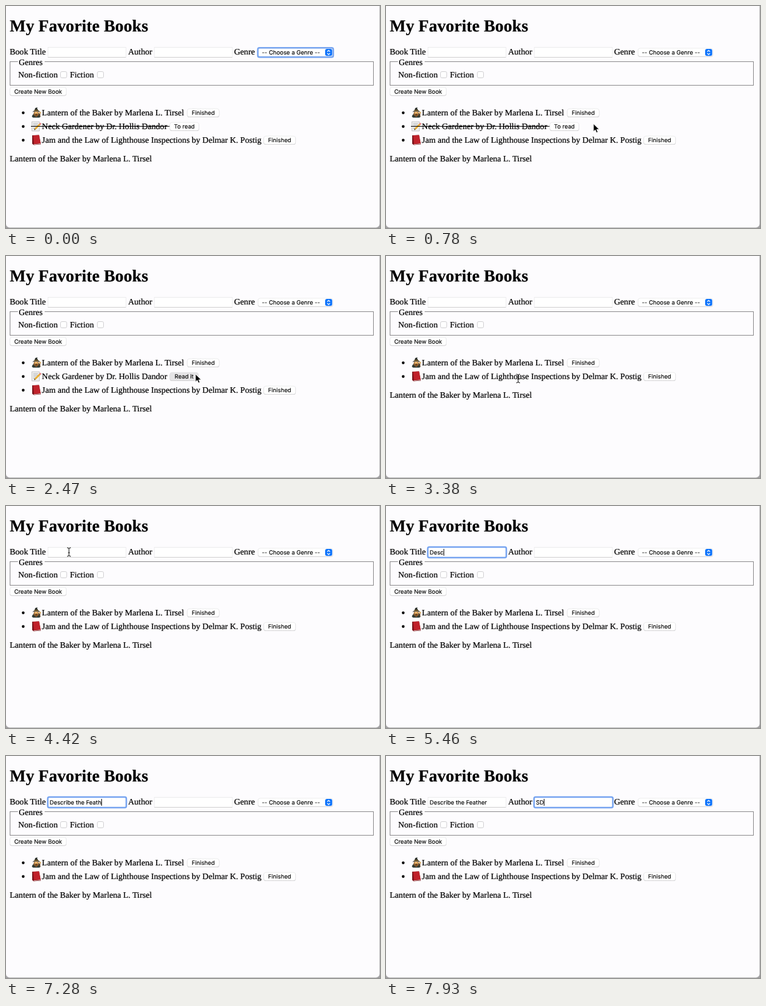
Animation, 600 px wide and 357 px high, one loop 8 s. Source, as an HTML page:

```html
<!DOCTYPE html>
<html lang="en">
<head>
<meta charset="utf-8">
<title>My Favorite Books</title>
<style>
  html, body { margin: 0; width: 100%; height: 100%; overflow: hidden; background: #a3a2a4; }
  svg { display: block; width: 100vw; height: 100vh; }
  text {
    font: 13.6px "Liberation Serif", Times, serif; white-space: pre;
    stroke: #000; stroke-width: .22; text-rendering: geometricPrecision;
  }
  .heading { font-size: 27.2px; font-weight: bold; }
  .ui { font: 9.3px Inter, sans-serif; stroke-width: .12; }
  .mid { text-anchor: middle; }
  .ring { fill: none; stroke: #78a5f0; stroke-width: 2.5; }
</style>
</head>
<body>
<svg id="stage" viewBox="0 0 600 357">
  <defs>
    <g id="mage">
      <path d="M1 15Q2 10 8 9T15 15L13 16.5H3Z" fill="#2f3b35"/>
      <path d="M4.5 7H11.5L12.5 12 8 15.5 3.5 12Z" fill="#8a5a2c"/>
      <circle cx="8" cy="9" r="2.8" fill="#e9b36a"/>
      <path d="M6 10.5Q8 9.8 10 10.5L8 13.5Z" fill="#5d3a1c"/>
      <path d="M1.5 7.5L5 5 6.5 1 10 0 9.5 2 11.5 5 15 7.5Q8 5.5 1.5 7.5Z" fill="#2b2f2a"/>
      <path d="M4.8 5.2Q8 4.2 11.5 5.2" fill="none" stroke="#a9802c"/>
      <path d="M14 9V15" stroke="#7c5128" stroke-width="1.1"/>
      <circle cx="14" cy="8.5" r="1.3" fill="#d99a31"/>
    </g>
    <g id="memo">
      <path d="M1 1H13V16H1Z" fill="#f0f0ee" stroke="#b9b9bb" stroke-width=".8"/>
      <path d="M3 4H11M3 6.5H11M3 9H9M3 11.5H8" stroke="#a0a4ac" stroke-width=".8"/>
      <path d="M6 13L14.5 4.5" stroke="#eaae30" stroke-width="2.6"/>
      <path d="M13.5 5.5L15.5 3.5" stroke="#e58387" stroke-width="2.6"/>
      <path d="M4.5 14.5L5 12 7 14Z" fill="#4c4136"/>
    </g>
    <g id="book">
      <path d="M1.5 1L12.5 .5 15.5 15.5 4 16.5 1.5 14.5Z" fill="#7d141c"/>
      <path d="M4 15.2L15 14V15L4.5 16Z" fill="#e4dad2"/>
      <path d="M3 1.2L12.5 .5 15 13.8 4.5 15Z" fill="#c0222b"/>
    </g>
  </defs>

  <rect y="-20" width="599.3" height="376.2" rx="6" fill="#fdfcfe"/>
  <text class="heading" x="6" y="41">My Favorite Books</text>
  <text x="6" y="78">Book Title</text>
  <text x="196" y="78">Author</text>
  <text x="366" y="78">Genre</text>
  <rect x="6.5" y="89.5" width="583" height="38" fill="none" stroke="#8b8a8c"/>
  <path d="M19 89.5H62" stroke="#fdfcfe" stroke-width="2"/>
  <text x="20.4" y="94.6">Genres</text>
  <text x="19.5" y="115">Non-fiction</text>
  <text x="102.5" y="115">Fiction</text>
  <g id="controls"></g>
  <g id="books"></g>
  <text id="current" x="6"></text>
  <rect id="ring" class="ring" rx="2.5"/>
  <text id="title" class="ui" x="70" y="77.5"></text>
  <text id="author" class="ui" x="240.5" y="77.5"></text>
  <path id="caret" stroke="#000"/>
  <path id="arrow" d="M0 0V12.4L2.8 9.7 4.8 14.2 7 13.2 5.1 9H9.1Z" fill="#000" stroke="#fff" stroke-width=".8"/>
  <path id="beam" d="M-3 -7Q0 -7 0 -5Q0 -7 3 -7M0 -5V5M-3 7Q0 7 0 5Q0 7 3 7M-1.5 1H1.5" fill="none" stroke="#111"/>
</svg>
<script>
const $ = id => document.getElementById(id);
const LOOP = 8000, STEP = 130;
const firstBook = 'Lantern of the Baker by Marlena L. Tirsel';
const typedTitle = 'Describe the Feather';

const button = (x, y, w, label, fill = '#fff') => `
  <rect x="${x}" y="${y + .7}" width="${w}" height="13.3" rx="3.5" fill="#c9c8ca"/>
  <rect x="${x + .2}" y="${y + .2}" width="${w - .4}" height="13" rx="3.5" fill="${fill}" stroke="#dddcde" stroke-width=".5"/>
  <text class="ui mid" x="${x + w / 2}" y="${y + 10.2}">${label}</text>`;

const field = x => `
  <rect x="${x}" y="66.5" width="125" height="16" fill="#fff" stroke="#e6e5e7" stroke-width=".7"/>
  <path d="M${x} 82.5H${x + 125}" stroke="#c9c8ca" stroke-width=".8"/>`;

const checkbox = x =>
  `<rect x="${x}" y="105.5" width="10" height="10" rx="2.3" fill="#fff" stroke="#c6c5c7" stroke-width=".8"/>`;

const bookRow = (y, icon, name, buttonX, buttonW, label, fill, struck) => `
  <circle cx="27.6" cy="${y - 4.2}" r="2.2"/>
  <use href="#${icon}" x="40.5" y="${y - 13}"/>
  <text x="57.6" y="${y}">${name}</text>
  ${struck ? `<path d="M40 ${y - 4.5}H${buttonX}" stroke="#000"/>` : ''}
  ${button(buttonX, y - 11, buttonW, label, fill)}`;

$('controls').innerHTML = field(67.3) + field(238) + checkbox(87.5) + checkbox(146.5) +
  button(6, 130.5, 91, 'Create New Book') + button(404, 67.8, 120.5, '') +
  `<text class="ui" x="410.6" y="78">-- Choose a Genre --</text>
   <rect x="512" y="69" width="11.3" height="11.3" rx="3" fill="#0f74fb"/>
   <path d="M515.4 73.5L517.6 71.3 519.8 73.5M515.4 76L517.6 78.2 519.8 76" fill="none" stroke="#fff" stroke-width="1.2"/>`;
$('current').textContent = firstBook;

// Pointer waypoints: time, x, y
const pointerPath = [
  [130, 594, 345], [910, 312, 177], [1430, 312, 177], [2080, 304, 190],
  [2730, 304, 190], [2990, 212, 197], [3770, 212, 197], [4420, 101, 74], [LOOP, 101, 74]
];
function pointerAt(t) {
  const i = Math.max(1, pointerPath.findIndex(p => p[0] >= t));
  const [t0, x0, y0] = pointerPath[i - 1], [t1, x1, y1] = pointerPath[i];
  const u = Math.max(0, (t - t0) / (t1 - t0)), e = u * u * (3 - 2 * u);
  return [x0 + (x1 - x0) * e, y0 + (y1 - y0) * e];
}

function drawBooks(t) {
  const removed = t >= 3250, toggled = t >= 2470, pressed = t >= 2340 && t < 2600;
  let html = bookRow(176, 'mage', firstBook, 290.7, 51.5, 'Finished');
  if (!removed) {
    html += bookRow(198, 'memo', 'Neck Gardener by Dr. Hollis Dandor', 262.7,
      toggled ? 46 : 47, toggled ? 'Read it' : 'To read', pressed ? '#e5e4e6' : '#fff', !toggled);
  }
  html += bookRow(removed ? 198 : 220, 'book',
    'Jam and the Law of Lighthouse Inspections by Delmar K. Postig', 413.3, 51.5, 'Finished');
  $('books').innerHTML = html;
  $('current').setAttribute('y', removed ? 228 : 250);
}

function drawRing(t) {
  const [x, y, w, h, since] =
    t < 520 ? [404, 67.3, 121, 15, -LOOP] :
    t < 4550 ? [0, 0, 0, 0, 0] :
    t < 7540 ? [67, 66, 126, 17, 4550] : [237.5, 66, 126.5, 17, 7540];
  const grow = 3.5 * Math.max(0, 1 - (t - since) / 260);
  const box = { x: x - grow, y: y - grow, width: w + 2 * grow, height: h + 2 * grow };
  for (const k in box) $('ring').setAttribute(k, Math.max(0, box[k]));
  $('ring').style.display = w ? '' : 'none';
}

function drawTyping(t) {
  const count = t < 4940 ? 0 : t <= 6500 ? 1 + Math.floor((t - 4940) / 141.8)
    : 13 + Math.floor((t - 6630) / 111.4);
  $('title').textContent = typedTitle.slice(0, count);
  $('author').textContent = t >= 7800 ? 'SD' : t >= 7670 ? 'S' : '';
  const active = t >= 7540 ? $('author') : $('title');
  const x = +active.getAttribute('x') + active.getComputedTextLength() + .5;
  $('caret').setAttribute('d', t >= 4550 ? `M${x} 69V80` : '');
}

function drawPointer(t) {
  const [x, y] = pointerAt(t);
  const overText = t >= 2860 && (y < 84 || y > 184);
  const visible = t >= 130 && t < 4940;
  for (const [id, on] of [['arrow', !overText], ['beam', overText]]) {
    $(id).setAttribute('transform', `translate(${x} ${y})`);
    $(id).style.display = visible && on ? '' : 'none';
  }
}

let last = -1;
function frame(now) {
  const t = Math.floor(now % LOOP / STEP) * STEP;
  if (t !== last) {
    last = t;
    drawBooks(t);
    drawRing(t);
    drawTyping(t);
    drawPointer(t);
  }
  requestAnimationFrame(frame);
}
requestAnimationFrame(frame);
</script>
</body>
</html>
```
